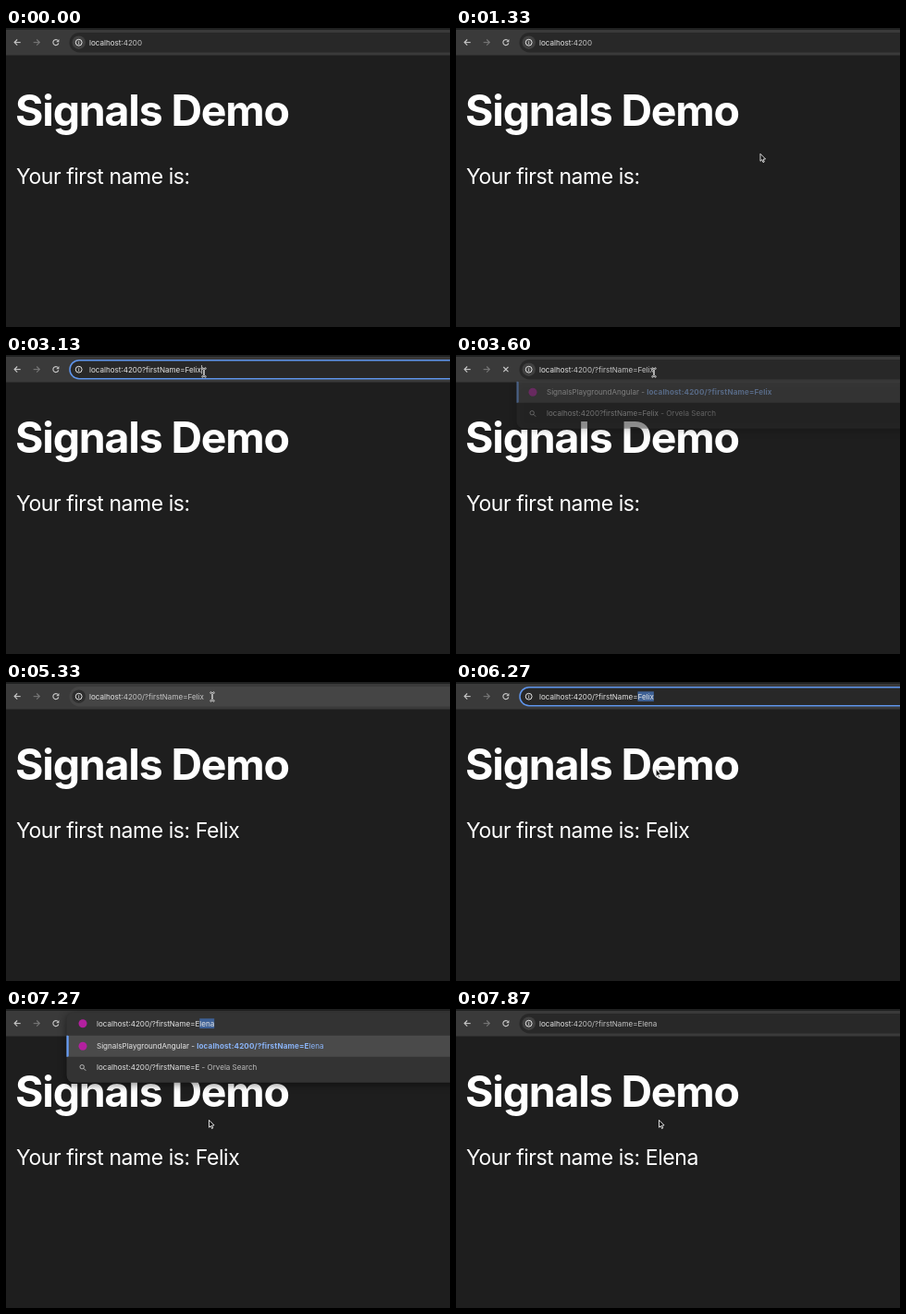
An HTML page with a canvas that plays this animation: 480x324 px, repeating every 8000 ms.

```html
<!DOCTYPE html>
<html lang="en">
<head>
<meta charset="utf-8">
<title>Signals Demo</title>
<style>
  html, body { margin: 0; width: 100%; height: 100%; overflow: hidden; background: #1e1e1e; }
  canvas { display: block; width: 480px; height: 324px; }
</style>
</head>
<body>
<canvas></canvas>
<script>
const W = 480, H = 324, LOOP = 8000, STEP = 1000 / 15;
const FONT = 'Inter, "Open Sans", sans-serif';
const HOST = 'localhost:4200', QUERY = HOST + '/?firstName=';
const FIRST = 'Felix', SECOND = 'Elena';
const BLUE = '#8ab4f8', SELECT = '#3e6196', WHITE = '#e6e6e6', GREY = '#bcbcbc';
const TOOL = '#c8c8c8';

const canvas = document.querySelector('canvas');
const c = canvas.getContext('2d');
const ratio = window.devicePixelRatio || 1;
canvas.width = W * ratio;
canvas.height = H * ratio;

// Pointer path: time, x, y of the hot spot
const path = [
  [1000, 458, 153], [1330, 329, 136], [1470, 329, 136], [2130, 194, 13],
  [2270, 194, 13], [2330, 198, 20], [2530, 216, 29], [2670, 216, 29],
  [2930, 214, 19], [4070, 214, 19], [4530, 271, 270], [4600, 271, 270],
  [4870, 274, 17], [5070, 274, 17], [5330, 223, 16], [5470, 223, 16],
  [5730, 206, 16], [6000, 206, 16], [6400, 219.5, 120]
];

function pointerAt(t) {
  if (t < path[0][0]) return null;
  const i = path.findIndex(p => p[0] > t);
  if (i < 0) return path[path.length - 1].slice(1);
  const [t0, x0, y0] = path[i - 1], [t1, x1, y1] = path[i];
  const k = (t - t0) / (t1 - t0), e = k * k * (3 - 2 * k);
  return [x0 + (x1 - x0) * e, y0 + (y1 - y0) * e];
}

// Suggestion rows: icon, plain label, bold part, light tail, tail colour
const urlRow = url => ['globe', '', url, '', BLUE];
const searchRow = q => ['search', q, '', ' - Orvela Search', GREY];
const pageRow = (bold, tail = '') => ['app', 'SignalsPlaygroundAngular - ', bold, tail, BLUE];

function stateAt(t) {
  const s = {
    name: t < 3670 ? '' : t < 7730 ? FIRST : SECOND,
    url: HOST, mode: 'idle', rows: [], fade: 1, icon: 'info'
  };
  if (t >= 2000 && t < 2200 || t >= 5130 && t < 5470) s.mode = 'hover';
  if (t >= 2200 && t < 3200) {
    s.mode = 'focus';
    if (t < 2800) s.select = HOST;
    if (t >= 3130) s.url = HOST + '?firstName=' + FIRST;
  } else if (t >= 3200 && t < 3670) {
    s.url = (t < 3600 ? HOST + '?firstName=' : QUERY) + FIRST;
    s.rows = [pageRow(QUERY + FIRST), searchRow(HOST + '?firstName=' + FIRST)];
    if (t < 3600) { s.mode = 'open'; s.icon = 'app'; }
    else { s.fade = 0.42; s.loading = true; }
  } else if (t >= 3670 && t < 6930) {
    s.url = QUERY + FIRST;
    if (t >= 5470) {
      s.mode = 'focus';
      if (t < 5670) s.select = s.url;
      if (t >= 5930) s.select = FIRST;
    }
  } else if (t >= 6930 && t < 7670) {
    s.mode = 'open';
    if (t < 7200) {
      const start = t < 7000 ? FIRST[0] : '';
      s.url = QUERY + start;
      s.icon = 'globe';
      s.rows = [urlRow(s.url), searchRow(s.url), pageRow(s.url, FIRST.slice(start.length))];
      if (!start) s.rows.push(pageRow(s.url, SECOND), pageRow(HOST));
    } else {
      const n = t < 7330 ? 1 : t < 7400 ? 2 : t < 7470 ? 3 : t < 7530 ? 4 : 5;
      const typed = QUERY + SECOND.slice(0, n);
      s.url = QUERY + SECOND;
      s.select = SECOND.slice(n);
      s.icon = 'app';
      s.rows = [pageRow(typed, s.select), searchRow(typed)];
    }
  } else if (t >= 7670) {
    s.url = QUERY + SECOND;
    s.loading = t < 7730;
    s.fade = s.loading ? 0.42 : 0.1;
    if (t < 7870) s.rows = [pageRow(s.url), searchRow(s.url)];
  }
  return s;
}

function text(str, x, y, color, weight = 400, size = 8.05, spacing = 0) {
  c.font = `${weight} ${size}px ${FONT}`;
  c.letterSpacing = spacing + 'px';
  c.fillStyle = color;
  c.fillText(str, x, y);
  return x + c.measureText(str).width;
}

function box(x, y, w, h, color, r = 0) {
  c.fillStyle = color;
  c.beginPath();
  c.roundRect(x, y, w, h, r);
  c.fill();
}

function line(color, width, ...pts) {
  c.strokeStyle = color;
  c.lineWidth = width;
  c.beginPath();
  pts.forEach(([x, y], i) => i ? c.lineTo(x, y) : c.moveTo(x, y));
  c.stroke();
}

function ring(x, y, r, color, width, from = 0, to = Math.PI * 2) {
  c.strokeStyle = color;
  c.lineWidth = width;
  c.beginPath();
  c.arc(x, y, r, from, to);
  c.stroke();
}

function disc(x, y, r, color) {
  c.fillStyle = color;
  c.beginPath();
  c.arc(x, y, r, 0, Math.PI * 2);
  c.fill();
}

function icon(kind, x, y) {
  if (kind === 'app') disc(x, y, 4.5, '#b3209f');
  if (kind === 'info') {
    ring(x, y, 3.4, WHITE, 1);
    line(WHITE, 0.9, [x, y - 0.4], [x, y + 1.9]);
    line(WHITE, 0.9, [x, y - 1.9], [x, y - 1]);
  }
  if (kind === 'search') {
    ring(x - 0.8, y - 0.8, 2.2, '#c4c4c4', 0.9);
    line('#c4c4c4', 1, [x + 0.9, y + 0.9], [x + 3.2, y + 3.2]);
  }
  if (kind === 'globe') {
    ring(x, y, 3.5, '#d0d0d0', 1);
    c.fillStyle = '#d0d0d0';
    c.beginPath();
    c.moveTo(x - 3.2, y - 1);
    c.lineTo(x - 0.4, y + 1.4);
    c.lineTo(x - 0.4, y + 3.3);
    c.lineTo(x - 2.6, y + 2);
    c.closePath();
    c.moveTo(x - 0.2, y - 3.2);
    c.lineTo(x + 1.8, y - 2.6);
    c.lineTo(x + 0.6, y - 0.6);
    c.lineTo(x - 1.6, y - 0.9);
    c.closePath();
    c.moveTo(x + 1, y + 0.4);
    c.lineTo(x + 3, y + 0.6);
    c.lineTo(x + 1.8, y + 2.6);
    c.closePath();
    c.fill();
  }
}

function drawPage(name) {
  box(0, 0, W, H, '#1e1e1e');
  text('Signals Demo', 10, 106, '#fff', 700, 46.5, -1.2);
  text('Your first name is: ' + name, 11, 169, '#fff', 400, 23, -0.44);
}

function drawToolbar(loading) {
  box(0, 0, W, 2, '#202121');
  box(0, 2, W, 27.5, '#3a3a3a');
  const y = 15.6, x = 53.9;
  for (const [ax, dir, color] of [[12.4, -1, TOOL], [33, 1, '#777']]) {
    line(color, 1.1, [ax - 3.3 * dir, y], [ax + 3 * dir, y]);
    line(color, 1.1, [ax + 0.2 * dir, y - 3.1], [ax + 3.3 * dir, y], [ax + 0.2 * dir, y + 3.1]);
  }
  if (loading) {
    line(TOOL, 1.1, [x - 2.6, y - 2.6], [x + 2.6, y + 2.6]);
    line(TOOL, 1.1, [x + 2.6, y - 2.6], [x - 2.6, y + 2.6]);
  } else {
    ring(x, y, 3, TOOL, 1.1, 0.3, 5.4);
    c.fillStyle = TOOL;
    c.beginPath();
    c.moveTo(x + 3.5, y - 3.7);
    c.lineTo(x + 3.5, y - 0.4);
    c.lineTo(x + 0.3, y - 0.4);
    c.fill();
  }
}

function drawList(s) {
  if (!s.rows.length) return;
  const open = s.mode === 'open', top = open ? 3.5 : 29;
  const bottom = 33.2 + 23.3 * s.rows.length;
  c.save();
  c.beginPath();
  c.rect(0, top - 2, W, H);
  c.clip();
  c.globalAlpha = s.fade;
  c.shadowColor = 'rgba(0,0,0,.5)';
  c.shadowBlur = 9 * ratio;
  c.shadowOffsetY = 2 * ratio;
  box(65.5, top, W, bottom - top, '#333', open ? 8 : [0, 0, 0, 8]);
  c.shadowColor = 'transparent';
  box(65.5, 28.8, W, 23, '#4a4a4a');
  box(65.5, 28.8, 2.2, 23, '#669df6', [0, 1, 1, 0]);
  s.rows.forEach(([kind, label, bold, tail, tailColor], i) => {
    const y = 40.3 + 23.2 * i;
    icon(kind, 83, y);
    let x = text(label, 98, y + 2.9, WHITE);
    x = text(bold, x, y + 2.9, BLUE, 700, 8.05, 0.15);
    text(tail, x, y + 2.9, tailColor);
  });
  c.restore();
}

function drawField(s) {
  const open = s.mode === 'open', focus = s.mode === 'focus', y = 18.6;
  if (!open) {
    box(68.5, 5, W, 21.5, s.mode === 'hover' ? '#454545' : '#282828', 10.7);
    if (focus) {
      c.strokeStyle = '#5f95ec';
      c.lineWidth = 1.5;
      c.beginPath();
      c.roundRect(69, 5.7, W, 20, 10);
      c.stroke();
    } else {
      disc(78.7, 15.7, 7.2, s.mode === 'hover' ? '#2e2e2e' : '#404040');
    }
  }
  icon(s.icon, open ? 83 : 78.7, 15.7);
  const x = open ? 98 : 90;
  const bright = open || focus;
  c.font = `400 8.05px ${FONT}`;
  c.letterSpacing = '0px';
  const end = x + c.measureText(s.url).width;
  if (s.select) {
    const w = c.measureText(s.select).width;
    box(end - w, 10.3, w, 10.8, SELECT);
  }
  const next = text('localhost', x, y, WHITE);
  text(s.url.slice(9), next, y, bright ? WHITE : '#c6c6c6');
  if (bright && !s.select) line('#eee', 0.7, [end + 0.6, 11], [end + 0.6, 20.5]);
}

function drawPointer([x, y]) {
  c.lineJoin = 'round';
  if (y < 32) {
    for (const [color, w] of [['#e8e8e8', 2], ['#222', 0.6]]) {
      line(color, w, [x, y - 4], [x, y + 4]);
      line(color, w, [x - 2.4, y - 4.8], [x, y - 3.6], [x + 2.4, y - 4.8]);
      line(color, w, [x - 2.4, y + 4.8], [x, y + 3.6], [x + 2.4, y + 4.8]);
    }
  } else {
    const shape = [[0, 0], [0, 8], [1.8, 6.4], [3, 9.3], [4.3, 8.7], [3.1, 5.9], [5.6, 5.7]];
    c.beginPath();
    shape.forEach(([dx, dy]) => c.lineTo(x + dx, y + 0.3 + dy));
    c.closePath();
    c.fillStyle = '#111';
    c.strokeStyle = '#eee';
    c.lineWidth = 0.9;
    c.fill();
    c.stroke();
  }
  c.lineJoin = 'miter';
}

function draw(now) {
  // The picture advances fifteen times a second
  const t = Math.round(Math.floor((now % LOOP) / STEP + 0.06) * STEP / 10) * 10 % LOOP;
  const s = stateAt(t), pointer = pointerAt(t);
  c.setTransform(ratio, 0, 0, ratio, 0, 0);
  drawPage(s.name);
  drawToolbar(s.loading);
  drawList(s);
  drawField(s);
  if (pointer) drawPointer(pointer);
}

const start = performance.now();
function tick() {
  draw(performance.now() - start);
  requestAnimationFrame(tick);
}
tick();
</script>
</body>
</html>
```
